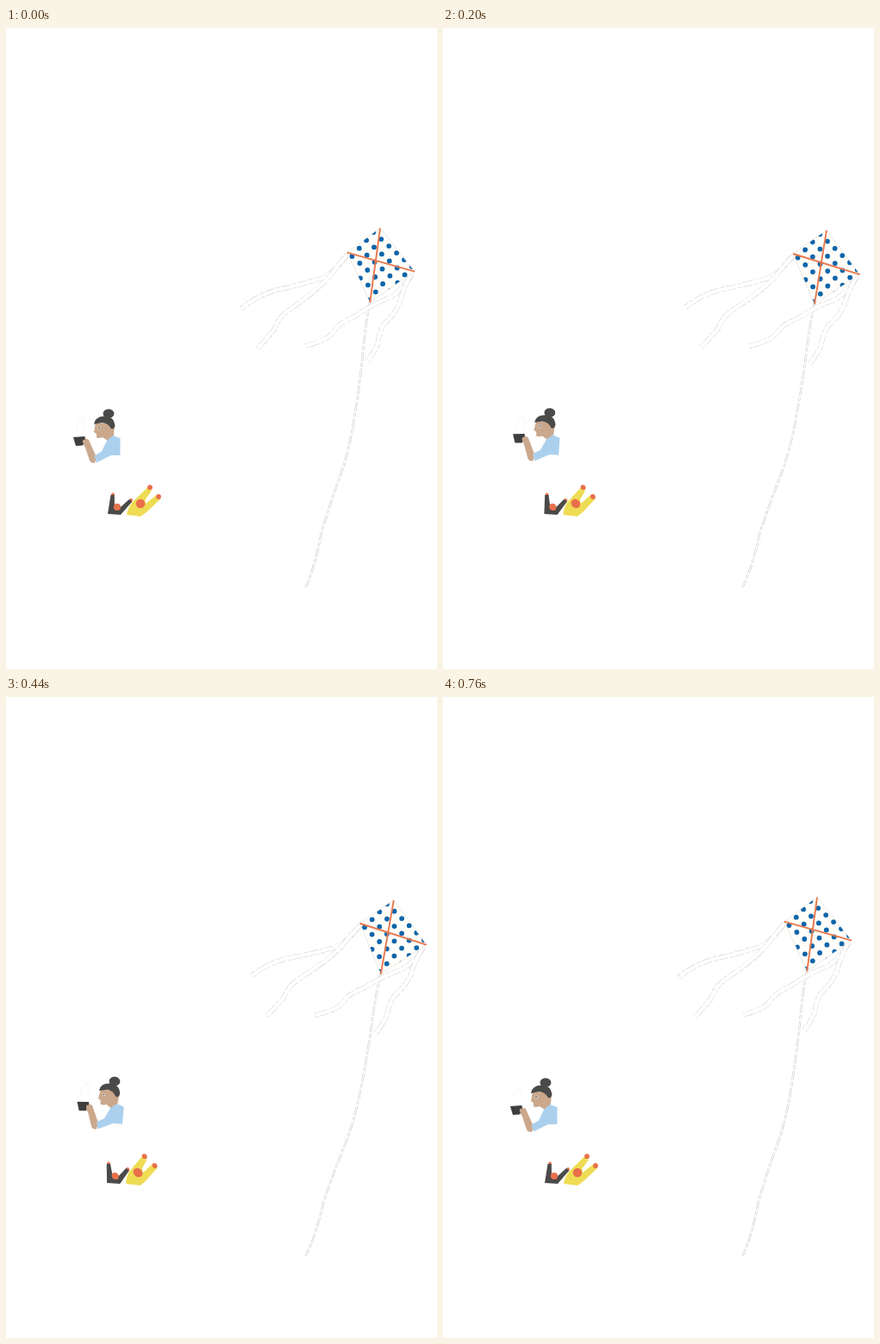
An HTML page with a canvas that plays this animation: 500x744 px, repeating every 1200 ms.

```html
<!DOCTYPE html>
<html lang="en">
<head>
<meta charset="utf-8">
<title>Kite</title>
<style>
html, body { margin: 0; height: 100%; overflow: hidden; background: #fff; }
canvas { display: block; }
</style>
</head>
<body>
<canvas id="stage" width="500" height="744"></canvas>
<script>
const ctx = document.getElementById('stage').getContext('2d');
const LOOP = 1200, STEP = 40, PEAK = 9, END = 19;
const INK = '#4a4a49', SKIN = '#cba88c', ORANGE = '#e8704b', BLUE = '#0f65aa';

const path = d => new Path2D(d);
const fill = (shape, color) => { ctx.fillStyle = color; ctx.fill(shape); };

function stroke(shape, color, width) {
  ctx.strokeStyle = color;
  ctx.lineWidth = width;
  ctx.stroke(shape);
}

function dot(x, y, rx, color, ry = rx) {
  ctx.beginPath();
  ctx.ellipse(x, y, rx, ry, 0, 0, 7);
  ctx.fillStyle = color;
  ctx.fill();
}

// White strip with a faint broken edge
function ribbon(shape, width, edge) {
  ctx.setLineDash([11, 1.5, 5, 2]);
  stroke(shape, edge, width);
  ctx.setLineDash([]);
  stroke(shape, '#fff', width - 1.1);
}

// Runs draw with the canvas turned about a pivot
function turned(x, y, angle, draw) {
  ctx.save();
  ctx.translate(x, y);
  ctx.rotate(angle);
  ctx.translate(-x, -y);
  draw();
  ctx.restore();
}

const kiteShape = path('M434 232L474 282.500L422.300 318.500L395.800 260.500Z');
const spars = path('M434 232.500L422.300 318.500M395.800 260.600L474 282.600');
const tails = [
  'M396 263Q383 282 367 290Q345 297 326 301.500Q306 305 290 314Q281 319 273 326',
  'M396 263Q384 276 375 289C360 305 346 315 330 326Q316 335 311 350Q302 361 292 372',
  'M471 285Q462 302 447 312Q422 322 404 335Q389 342 384 347Q377 357 372 360Q360 366 348 369',
  'M470 286Q461 301 457 318Q450 334 439 343Q433 352 431 367Q425 380 417.500 389'
].map(path);
const string = path('M422 318Q417 345 414 377T404.500 450Q399 486 389 516Q376 552 366 585Q359 624 347.500 649');

function kite() {
  ribbon(string, 2.3, '#c8c8c8');
  tails.forEach(t => ribbon(t, 5.4, '#d4d4d4'));
  fill(kiteShape, '#fffefa');
  ctx.save();
  ctx.clip(kiteShape);
  for (let i = -1; i < 8; i++)
    for (let j = -3; j < 5; j++)
      dot(401.5 + 8.9 * i + 8.3 * j, 265 + 8 * i - 9.3 * j, 2.9, BLUE);
  ctx.restore();
  stroke(kiteShape, '#dddbd6', 0.6);
  stroke(spars, '#e8784c', 1.9);
}

const steam = path('M83 468Q80 461 84 457T83 452M89 466Q93 460 89 457T91 452');
const arm = path('M89 478Q92 475 96 478L99 485L105 498L103 505Q98 505 97 502L92 487Q89 483 89 478Z');
const sleeve = path('M102.500 496.500L111 491.500L117 479L124 473L132.500 476V496L122 496L105 504.500Z');
const face = path('M104 458L102 469L105 471V475Q107 477 112 475L118 479L125 473L126 459Z');
const hair = path('M102 460Q103 451 114 450.500Q125 450 126.500 461Q126 466 122 465Q118 458 111 458Z');
const cup = path('M78 475L91.500 474L92 478L89 484.500L81 485Z');

function drinker() {
  stroke(steam, '#f2f2f2', 0.7);
  fill(arm, SKIN);
  fill(face, SKIN);
  fill(sleeve, '#abd0ee');
  dot(119, 447.5, 6.4, INK, 5.3);
  fill(hair, INK);
  dot(108, 464, 1.6, '#fff');
  dot(108, 464, 0.9, INK);
  fill(cup, '#3f3e3e');
  dot(91.5, 480, 2.6, SKIN);
}

const darkChild = path('M118 564L121.500 542L125.800 542L126 556L133 556L143 547L146.500 549.500L133 565Z');
const yellowChild = path('M140 565Q141 558 146 551L164 533.500L169 537L161.500 547.500L162 552L174 542.500L179.500 546.500L163 562L156 567Z');

function children() {
  dot(124, 541.5, 1.9, ORANGE);
  dot(145, 547.8, 1.9, ORANGE);
  fill(darkChild, INK);
  dot(129, 556, 4.1, ORANGE);
  fill(yellowChild, '#eedc54');
  dot(167, 533.2, 2.9, ORANGE);
  dot(177, 544, 2.9, ORANGE);
  dot(156, 552, 5.3, ORANGE);
}

function frame(now) {
  const s = Math.min(Math.floor(now % LOOP / STEP), END);
  const sway = s < PEAK ? s / PEAK : (END - s) / (END - PEAK);

  ctx.clearRect(0, 0, 500, 744);
  turned(347, 649, 0.0475 * sway, kite);
  turned(137, 521, 0.118 * sway, drinker);

  const lean = 0.22 * sway;
  ctx.save();
  ctx.transform(1, 0, lean, 1, -lean * 569, 0);
  children();
  ctx.restore();
}

let start;
function tick(now) {
  start ??= now;
  frame(now - start);
  requestAnimationFrame(tick);
}
requestAnimationFrame(tick);
</script>
</body>
</html>
```
